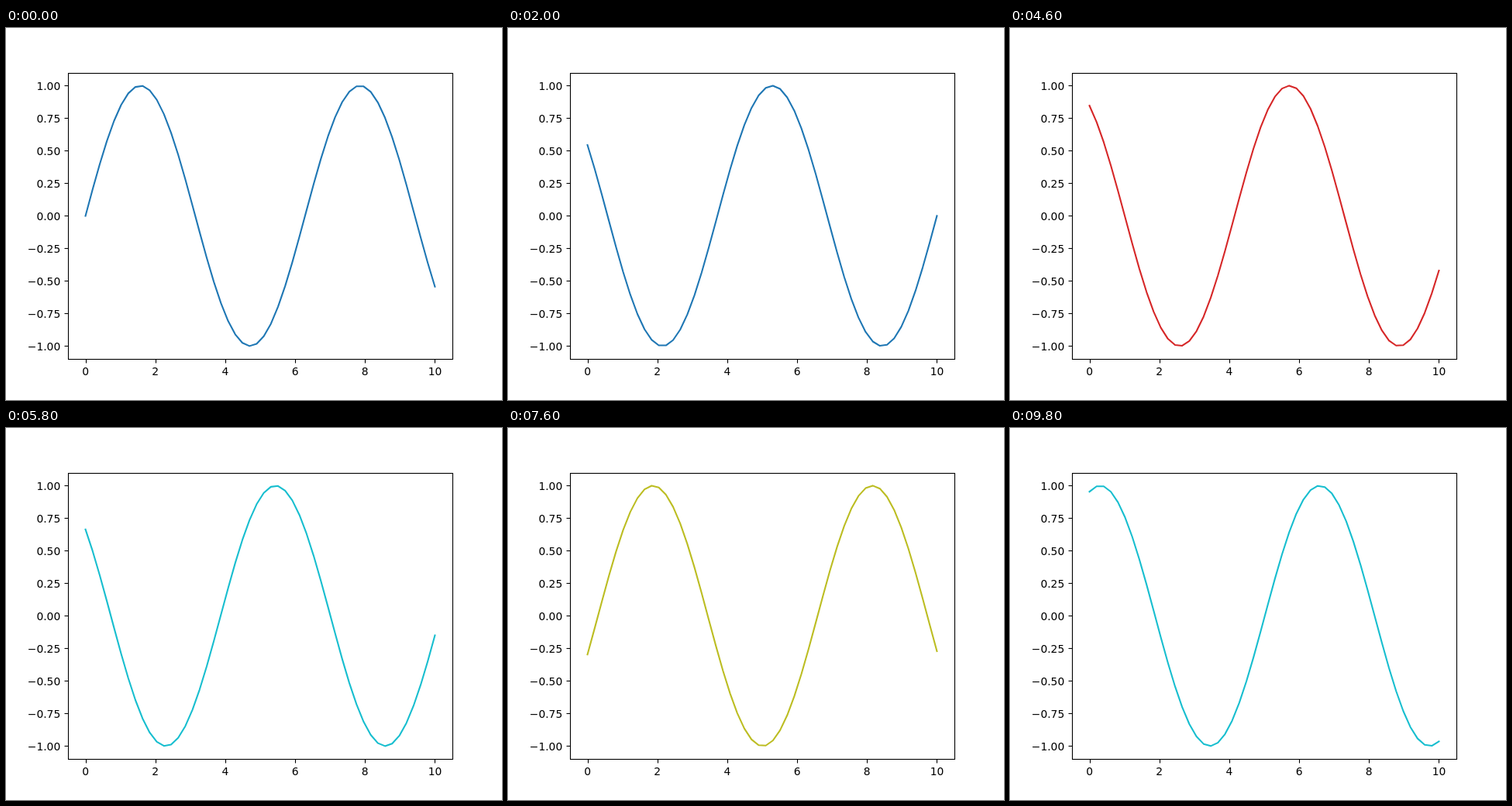
Recreate the animation shown at these times as an HTML page with a canvas. Size 640x480 px, loop 10 s.

```html
<!DOCTYPE html>
<html lang="en">
<head>
<meta charset="utf-8">
<title>Travelling sine wave</title>
<style>
  html, body { margin: 0; width: 100%; height: 100%; overflow: hidden; background: #fff; }
  canvas { display: block; }
</style>
</head>
<body>
<canvas id="stage" width="640" height="480"></canvas>
<script>
const ctx = document.getElementById('stage').getContext('2d');

const STEP_MS = 200, STEPS = 50, POINTS = 50;
const COLORS = ['#1f77b4', '#ff7f0e', '#2ca02c', '#d62728', '#9467bd',
                '#8c564b', '#e377c2', '#7f7f7f', '#bcbd22', '#17becf'];
const LEFT = 80, RIGHT = 576, TOP = 57.6, BOTTOM = 427.2;

// Data ranges: x from -0.5 to 10.5, y from -1.1 to 1.1
const toX = x => LEFT + (x + 0.5) / 11 * (RIGHT - LEFT);
const toY = y => TOP + (1.1 - y) / 2.2 * (BOTTOM - TOP);
const snap = v => Math.floor(v + 0.5) + 0.5;

function segment(x1, y1, x2, y2) {
  ctx.beginPath();
  ctx.moveTo(x1, y1);
  ctx.lineTo(x2, y2);
  ctx.stroke();
}

function drawAxes() {
  const left = snap(LEFT), bottom = snap(BOTTOM);
  ctx.strokeStyle = ctx.fillStyle = '#000';
  ctx.lineWidth = 0.8 * 100 / 72;
  ctx.lineCap = 'butt';
  ctx.lineJoin = 'miter';
  ctx.font = '13.889px "DejaVu Sans", sans-serif';
  ctx.textBaseline = 'alphabetic';
  ctx.strokeRect(left, snap(TOP), snap(RIGHT) - left, bottom - snap(TOP));

  ctx.textAlign = 'center';
  for (let x = 0; x <= 10; x += 2) {
    const px = snap(toX(x));
    segment(px, bottom, px, bottom + 5);
    ctx.fillText(x, toX(x), 448);
  }

  ctx.textAlign = 'right';
  for (let y = -1; y <= 1; y += 0.25) {
    const py = snap(toY(y));
    segment(left, py, left - 5, py);
    ctx.fillText(y.toFixed(2).replace('-', '\u2212'), 70.28, Math.round(toY(y) + 5.5));
  }
}

function drawWave(step) {
  ctx.strokeStyle = COLORS[step % COLORS.length];
  ctx.lineWidth = 1.5 * 100 / 72;
  ctx.lineCap = 'square';
  ctx.lineJoin = 'round';
  ctx.beginPath();
  for (let i = 0; i < POINTS; i++) {
    const x = 10 * i / (POINTS - 1);
    ctx.lineTo(toX(x), toY(Math.sin(x - step)));
  }
  ctx.stroke();
}

function render() {
  const step = Math.floor(performance.now() / STEP_MS) % STEPS;
  ctx.fillStyle = '#fff';
  ctx.fillRect(0, 0, 640, 480);
  drawWave(step);
  drawAxes();
  requestAnimationFrame(render);
}
render();
</script>
</body>
</html>
```
